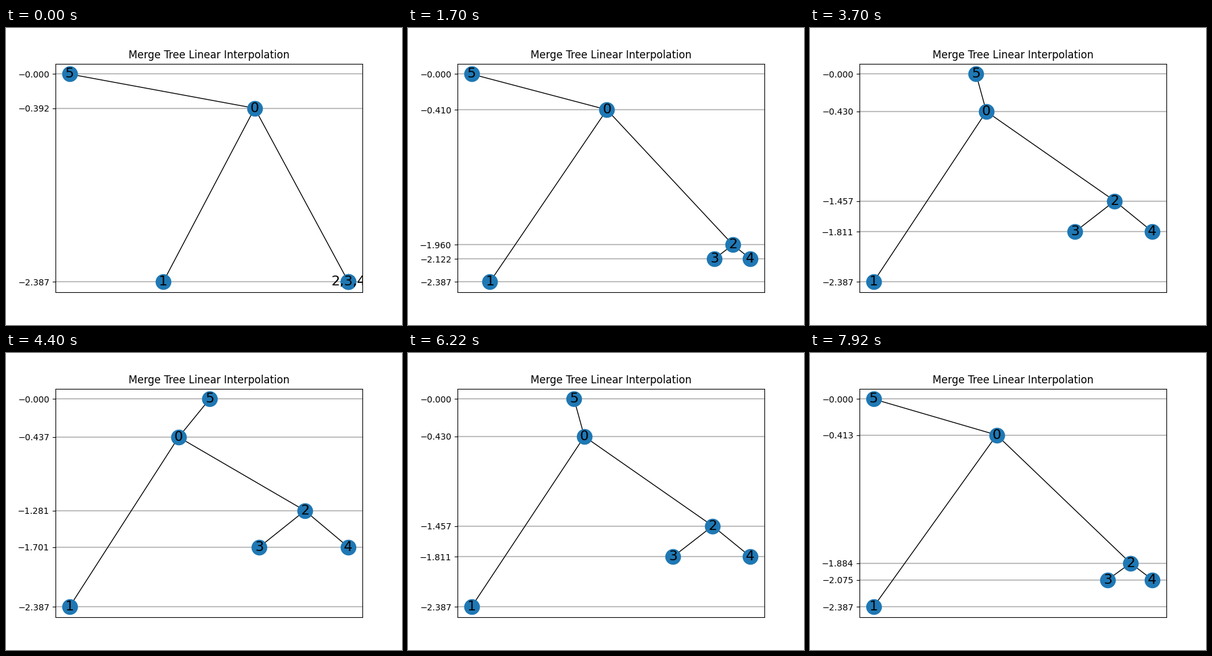
Write a matplotlib script that moves like this. It is 640 px wide and 480 px high and loops after 8000 ms.

```python
import numpy as np
import matplotlib.pyplot as plt
from matplotlib.animation import FuncAnimation

TICK_MS = 20
LOOP_MS = 8000
STEP_MS = 100
LAST = 49            # step at which the motion turns back
TURN_MS = 5120       # first step on the way back
DEPTH = 2.387
EDGES = [(5, 0), (0, 1), (0, 2), (2, 3), (2, 4)]


def step_at(ms):
    if ms < TURN_MS:
        return min(ms // STEP_MS, LAST)
    return LAST - 1 - (ms - TURN_MS) // STEP_MS


def heights(s):
    fork = DEPTH - 0.025126 * s
    leaf = DEPTH - 0.01558 * s
    return -np.array([0.3924 + 0.00102 * s, DEPTH, fork, leaf, leaf, 0])


def positions(s):
    """Node x in 0..1, from distances to node 4 in units of node 1's distance."""
    d3 = s * (0.00869 - 0.00003215 * s)
    d0 = 0.506 + 0.00284 * s - 0.0000115 * s**2
    d5 = 1.5058 - 0.02727 * s + 0.000099 * s**2
    dist = np.array([d0, 1, 0.4875 * d3, d3, 0, d5])
    return 1 - dist / dist.max()


fig, ax = plt.subplots(figsize=(6.4, 4.8), dpi=100)
ax.set_title("Merge Tree Linear Interpolation")
ax.set_xlim(-0.05, 1.05)
ax.set_ylim(-1.05 * DEPTH, 0.05 * DEPTH)
ax.xaxis.set_visible(False)
ax.set_axisbelow(True)
ax.grid(axis="y", color="#bfbfbf", linewidth=1.5)

lines = [ax.plot([], [], color="black", lw=1, zorder=1.5)[0] for _ in EDGES]
nodes = ax.scatter(np.zeros(6), np.zeros(6), s=300, c="#1f78b4", zorder=2)
names = [ax.text(0, 0, str(i), size=16, ha="center", va="center",
                 clip_on=True, zorder=3) for i in range(6)]
shown = None


def draw_step(s):
    x, y = positions(s), heights(s)
    nodes.set_offsets(np.column_stack([x, y]))
    for line, (a, b) in zip(lines, EDGES):
        line.set_data([x[a], x[b]], [y[a], y[b]])
    for name, px, py in zip(names, x, y):
        name.set_position((px, py))
    # Nodes 2, 3 and 4 coincide at the start and share one label.
    merged = s == 0
    names[2].set_text("2,3,4" if merged else "2")
    for i in (3, 4):
        names[i].set_visible(not merged)
    ticks = np.unique(y)
    ax.set_yticks(ticks, [f"\u2212{abs(t):.3f}" for t in ticks])


def update(frame):
    global shown
    s = step_at(frame * TICK_MS)
    if s != shown:
        draw_step(s)
        shown = s
    return []


def init():
    global shown
    shown = None
    return update(0)


anim = FuncAnimation(fig, update, frames=LOOP_MS // TICK_MS, init_func=init,
                     interval=TICK_MS, repeat=True, repeat_delay=0, blit=False)
plt.show()
```
